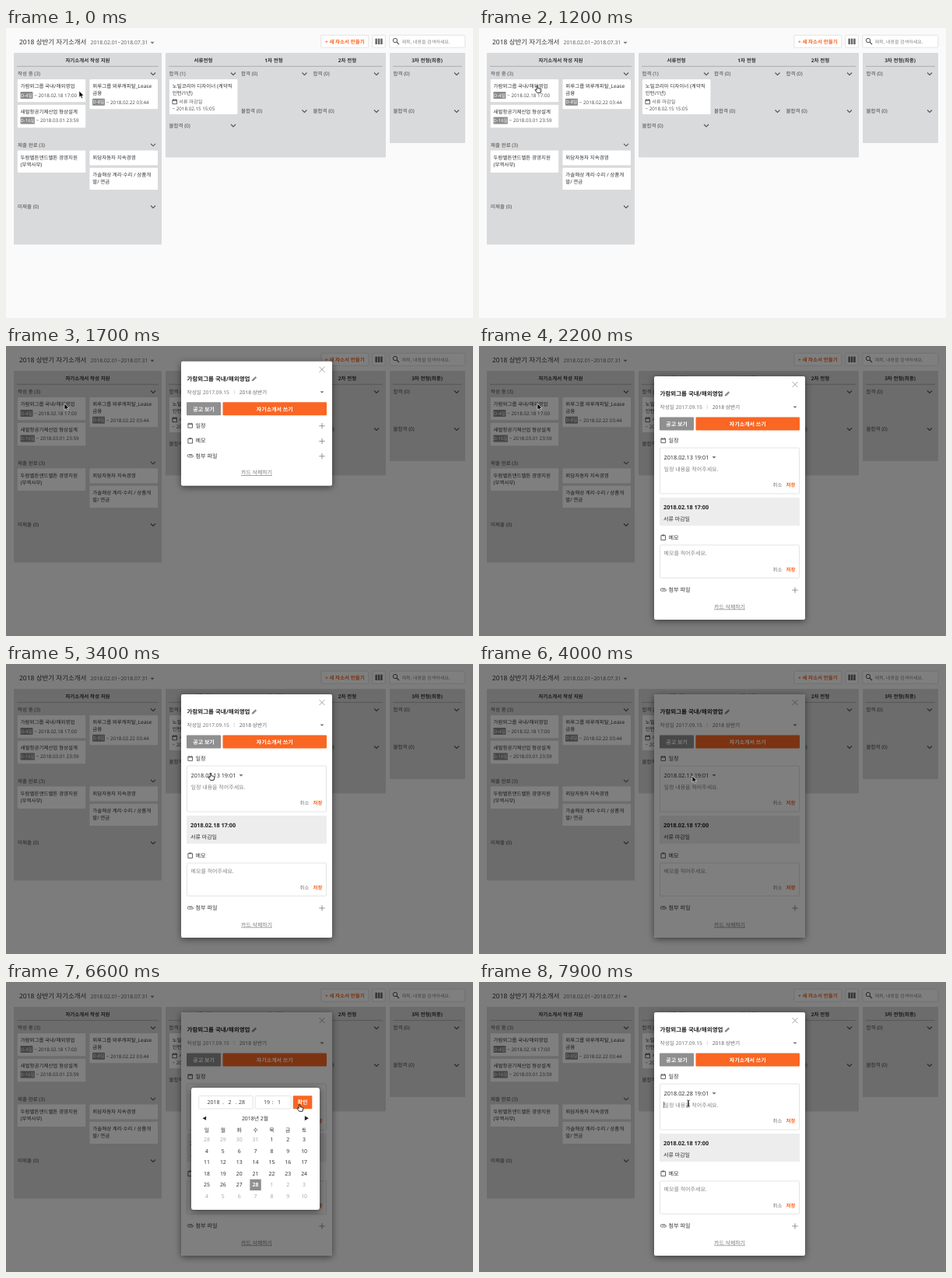
Recreate the animation shown at these times as an HTML page. Size 600 px wide and 373 px high, loop 8 s.

```html
<!DOCTYPE html>
<html>
<head>
<meta charset="utf-8">
<title>Application board</title>
<style>
html, body { margin: 0; width: 100%; height: 100%; overflow: hidden; background: #fafafa; }
svg { display: block; width: 600px; height: 373px; }
text { font-family: "Noto Sans", "Noto Sans CJK KR", "Noto Sans CJK", sans-serif; text-rendering: geometricPrecision; white-space: pre; }
.card { filter: drop-shadow(0 .6px .6px rgba(0,0,0,.22)); }
.panel { filter: drop-shadow(0 2px 4px rgba(0,0,0,.5)); }
</style>
</head>
<body>
<svg id="stage" viewBox="0 0 600 373"></svg>
<script>
const LOOP = 8000, ORANGE = '#fa6623', DARK = '#333', GREY = '#858585';

// Text is placed by its vertical middle.
const text = (x, y, s, size = 6.5, fill = DARK, extra = '') =>
  `<text x="${x}" y="${y + size * .37}" font-size="${size}" fill="${fill}" ${extra}>${s}</text>`;
const BOLD = 'font-weight="700"', MID = 'text-anchor="middle"', MIDBOLD = MID + ' ' + BOLD;
const rect = (x, y, w, h, fill, extra = '') =>
  `<rect x="${x}" y="${y}" width="${w}" height="${h}" fill="${fill}" ${extra}/>`;
const outline = (x, y, w, h) => rect(x, y, w, h, '#fff', 'stroke="#ddd" stroke-width=".8" rx="1"');
const line = (d, color = '#666', width = 1) =>
  `<path d="${d}" fill="none" stroke="${color}" stroke-width="${width}"/>`;
const shape = (d, fill) => `<path d="${d}" fill="${fill}"/>`;
const chevron = (x, y) => line(`M${x - 3} ${y - 1.5}l3 3 3-3`, '#555', 1.1);
const triangle = (x, y) => shape(`M${x - 2.5} ${y - 1.2}h5l-2.5 2.6z`, '#777');
const plus = (x, y) => line(`M${x - 3.7} ${y}h7.4M${x} ${y - 3.7}v7.4`, '#888', .9);
const calendarIcon = (x, y) =>
  line(`M${x - 2.8} ${y - 2.4}h5.6v5.3h-5.6zM${x - 2.8} ${y - 1.5}h5.6M${x - 1.6} ${y - 3.5}v1M${x + 1.6} ${y - 3.5}v1`, '#555', .9);
const clipboardIcon = (x, y) =>
  line(`M${x - 2.8} ${y - 2.7}h5.6v6h-5.6z`, '#555', .9) + rect(x - 1.4, y - 3.7, 2.8, 1.7, '#555');
const clipIcon = (x, y) =>
  line(`M${x + 2.5} ${y - 1.6}h-4.4a1.6 1.6 0 0 0 0 3.2h4.6a1.1 1.1 0 0 0 0-2.2h-4`, '#555', .8);
const group = (id, body, extra = '') => `<g id="${id}" ${extra}>${body}</g>`;

const card = (x, y, w, h, lines) => rect(x, y, w, h, '#fff', 'rx="1" class="card"') +
  lines.map((s, i) => text(x + 4, y + 9 + i * 9, s)).join('');
const due = (x, y, badge, date) => {
  const w = badge.length > 4 ? 18.5 : 16;
  return rect(x, y - 4.5, w, 9, '#8b8b8b', 'rx="1"') +
    text(x + w / 2, y, badge, 5.9, '#fff', MID) +
    text(x + w + 1.8, y, '~ ' + date, 6.25, '#555');
};
const section = (x, y, label, chevronX) => text(x, y, label, 6.5, '#4a4a4a', 'font-weight="500"') + chevron(chevronX, y);
const column = (x, w, h) => rect(x, 32, w, h, '#d9dadc', 'rx="1"') + line(`M${x + 4} 49.3h${w - 8}`, '#aaa', .9);
const heading = (x, s) => text(x, 41.3, s, 6.5, DARK, MIDBOLD);

const header =
  text(17, 18.2, '2018 상반기 자기소개서', 8.5, DARK, 'font-weight="500"') +
  text(108.5, 18.8, '2018.02.01~2018.07.31', 6.85, '#666') + triangle(188, 19) +
  outline(404.8, 9.2, 61, 16) + text(435.3, 17.3, '+ 새 자소서 만들기', 6.5, ORANGE, MIDBOLD) +
  outline(470.8, 9.2, 16.5, 16) + [474.4, 477.8, 481.2].map(x => rect(x, 13.6, 2.5, 7.4, '#666')).join('') +
  outline(492.8, 9.2, 97, 16) +
  '<circle cx="500" cy="16" r="2.7" fill="none" stroke="#555"/>' + line('M502 18l3 3.2', '#555', 1.2) +
  text(508.5, 17.3, '제목, 내용을 검색하세요.', 6.05, '#888');

const board =
  column(10, 190, 246.5) + heading(105, '자기소개서 작성 지원') +
  section(15, 59, '작성 중 (3)', 189) +
  card(14.5, 66, 88, 29.5, ['가람뫼그룹 국내/해외영업']) + due(18.5, 86.5, 'D-4일', '2018.02.18 17:00') +
  card(14.5, 98.5, 88, 30, ['새벌항공기체산업 형상설계']) + due(18.5, 119, 'D-16일', '2018.03.01 23:59') +
  card(107.2, 66, 88, 38.5, ['뫼루그룹 뫼루캐피탈_Lease', '금융']) + due(111, 95.3, 'D-8일', '2018.02.22 03:44') +
  section(15, 150.3, '제출 완료 (3)', 189) +
  card(14.5, 157.3, 88, 28.7, ['두람벨튼앤드벨튼 경영지원', '(무역사무)']) +
  card(107.2, 157.3, 88, 19.5, ['뫼담자동차 지속경영']) +
  card(107.2, 179.6, 88, 28.6, ['가솔해상 계리·수리 / 상품개', '발/ 연금']) +
  section(15, 230, '미제출 (0)', 189) +
  column(205, 283, 134.5) +
  heading(253.5, '서류전형') + heading(344, '1차 전형') + heading(438.5, '2차 전형') +
  section(209.5, 59, '합격 (1)', 292) + section(209.5, 125.5, '불합격 (0)', 292) +
  card(209.7, 66, 88, 45, ['노빌코리아 디자이너 (계약직', '인턴/1년)']) +
  calendarIcon(216.7, 94.8) + text(222, 94.7, '서류 마감일', 6.3, '#666') +
  text(213.5, 103.3, '~ 2018.02.15 15:05', 6.25, '#555') +
  column(493, 97, 116) + heading(541, '3차 전형(최종)') +
  [[302, 383.5], [394.5, 476], [497.5, 579]].map(([x, c]) =>
    section(x, 59, '합격 (0)', c) + section(x, 107, '불합격 (0)', c)).join('');

const formActions = y => text(377.5, y, '취소', 6.5, '#777') + text(394.5, y, '저장', 6.5, ORANGE, BOLD);
const rowTitle = (y, s) => text(243.5, y, s, 7.1, DARK);

const modal =
  rect(225, 39, 194, 313, '#fff', 'id="sheet" rx="2" class="panel"') +
  line('M402.5 46l7 7m0-7l-7 7', '#999', .9) +
  text(232.5, 61.3, '가람뫼그룹 국내/해외영업', 7.5, '#222', BOLD) +
  shape('M315.7 64.6l.5-2 4.3-4.3 1.6 1.6-4.3 4.3z', '#8a8a8a') +
  text(232.5, 78.6, '작성일 2017.09.15', 6.7, '#777') + line('M293.3 75.8v5.4', '#ccc', .7) +
  text(299.7, 78.6, '2018 상반기', 6.7, '#666') + triangle(406, 78.6) +
  rect(232, 91.5, 44, 17, '#8f8f8f', 'rx="1"') + text(254, 100.2, '공고 보기', 7, '#fff', MIDBOLD) +
  rect(278.5, 91.5, 133.5, 17, ORANGE, 'rx="1"') + text(345.3, 100.2, '자기소개서 쓰기', 7, '#fff', MIDBOLD) +
  calendarIcon(236.7, 121.5) + rowTitle(121.3, '일정') +
  group('compact', plus(406, 122) + plus(406, 141.7)) +
  group('forms',
    outline(232.5, 131, 179, 59) + text(237.5, 143.2, '', 7.3, DARK, 'id="when"') + triangle(302, 143.3) +
    text(237.5, 158, '일정 내용을 적어주세요.', 7, GREY) +
    line('M237.6 154v8', '#222', .7).replace('<path', '<path id="caret"') + formActions(179) +
    rect(232, 195, 180, 36.3, '#ededed', 'rx="1"') +
    text(237, 207.3, '2018.02.18 17:00', 7.3, '#222', 'font-weight="600"') + text(237, 222, '서류 마감일', 7, DARK) +
    outline(232.5, 256, 179, 42.3) + text(237.5, 266.7, '메모를 적어주세요.', 7, GREY) + formActions(287.5)) +
  group('memo', clipboardIcon(236.7, 246.3) + rowTitle(246, '메모')) +
  group('files', clipIcon(236.7, 313.5) + rowTitle(313.3, '첨부 파일') + plus(406, 314) +
    text(322, 335, '카드 삭제하기', 6.9, '#777', MID + ' text-decoration="underline"'));

const DAY_STEP = 20.85, ROW_STEP = 14.65;
const dayX = i => 258 + (i % 7) * DAY_STEP, dayY = i => 202.3 + Math.floor(i / 7) * ROW_STEP;

function dayCells() {
  let cells = '';
  for (let i = 0; i < 42; i++) {
    const n = i - 3, inside = n >= 1 && n <= 28;
    const label = n < 1 ? n + 31 : n > 28 ? n - 28 : n;
    cells += text(dayX(i), dayY(i), label, 6.9, inside ? DARK : '#aaa', MID);
  }
  return cells;
}

const picker =
  rect(238, 136, 165, 157, '#fff', 'rx="3" class="panel"') +
  outline(247.7, 146.5, 69.5, 16.5) + outline(320.2, 146.5, 46, 16.5) +
  [[258.5, '2018'], [278, '.'], [285.5, '2'], [294.5, '.'], [331, '19'], [341.8, ':'], [349, '1']]
    .map(([x, s]) => text(x, 154.8, s, 7, '#444')).join('') +
  text(299, 154.8, '', 7, '#444', 'id="dayField"') +
  rect(368.8, 146.3, 24.5, 17, ORANGE, 'rx="1"') + text(381, 154.8, '확인', 7, '#fff', MIDBOLD) +
  shape('M252.5 175.3l4.6-2.5v5z', '#222') + shape('M388.8 175.3l-5-3v6z', '#222') +
  text(320, 175.2, '2018년 2월', 6.9, DARK, MID) +
  [...'일월화수목금토'].map((s, i) => text(dayX(i), 190, s, 6.9, DARK, MID + ' font-weight="500"')).join('') +
  dayCells() +
  group('picked', rect(-7.2, -7.2, 14.4, 14.4, '#8f8f8f') + text(0, 0, '', 6.9, '#fff', MIDBOLD + ' id="pickedDay"'));

const cursors =
  group('arrow', '<path d="M0 0v8.2l1.9-1.7 1.3 2.9 1.4-.6-1.3-2.8h2.6z" fill="#000" stroke="#fff" stroke-width=".6"/>') +
  group('hand', '<path d="M-.8 .6q.8-1.2 1.6 0v3l3.2 .7q1 .4 .8 1.6l-.7 3.4h-4.5l-2.6-3.6q.2-1.2 1.3-.6l.9 .7z" fill="#fff" stroke="#000" stroke-width=".8"/>') +
  group('beam', line('M-1.7-4q1.7 0 1.7 1v6q0 1-1.7 1M1.7-4q-1.7 0-1.7 1v6q0 1 1.7 1', '#111', .8));

const veil = id => rect(0, 0, 600, 373, '#000', `id="${id}"`);
document.getElementById('stage').innerHTML =
  rect(0, 0, 600, 373, '#fafafa') + header + board + veil('backdrop') +
  group('modal', modal + rect(225, 39, 194, 313, '#000', 'id="modalVeil" rx="2"')) +
  group('picker', picker) + group('cursor', cursors);

const el = id => document.getElementById(id);
const set = (id, attrs) => { for (const k in attrs) el(id).setAttribute(k, attrs[k]); };
const show = (id, on) => { el(id).style.display = on ? '' : 'none'; };
const smooth = p => p * p * (3 - 2 * p);
const linear = p => p;

// Keys are [time, value, ...]; returns the values at time t.
function track(t, keys, ease = linear) {
  const next = keys.findIndex(k => k[0] > t);
  if (next === 0) return keys[0].slice(1);
  if (next < 0) return keys[keys.length - 1].slice(1);
  const a = keys[next - 1], b = keys[next], p = ease((t - a[0]) / (b[0] - a[0]));
  return a.slice(1).map((v, i) => v + (b[i + 1] - v) * p);
}

const POINTER = [[100, 94, 81], [800, 75, 74], [2800, 75, 74], [3500, 274, 144], [4700, 274, 144],
  [5200, 321, 259], [5700, 321, 259], [6400, 377, 157], [7300, 377, 157], [7700, 269, 156]];
const POINTER_KINDS = [[0, 'arrow'], [800, 'hand'], [1300, 'arrow'], [3400, 'hand'], [3900, 'arrow'],
  [5000, 'hand'], [5800, 'arrow'], [6400, 'hand'], [7000, 'beam']];

function draw(t) {
  const [fade] = track(t, [[1250, 0], [1400, .7], [1500, 1]]);
  const [lift] = track(t, [[1300, -48], [1400, -41], [1800, -12], [1950, 0]]);
  const open = t >= 1900;
  set('backdrop', { opacity: fade * .5 });
  set('modal', { opacity: fade, transform: `translate(0 ${lift})` });
  set('sheet', { height: open ? 313 : 160 });
  show('forms', open);
  show('compact', !open);
  set('memo', { transform: `translate(0 ${open ? 0 : -105.3})` });
  set('files', { transform: `translate(0 ${open ? 0 : -153})` });

  const [veilLevel] = track(t, [[3800, 0], [4000, .5], [6800, .5], [7000, 0]]);
  set('modalVeil', { opacity: veilLevel });
  const [seen, drop] = track(t, [[4000, 0, -40], [4100, .6, -30], [4300, 1, 0], [6700, 1, 0], [6900, 0, -30]]);
  set('picker', { opacity: seen, transform: `translate(0 ${drop})` });

  const day = t >= 5400 ? 28 : 13, cell = day + 3;
  el('dayField').textContent = el('pickedDay').textContent = day;
  set('picked', { transform: `translate(${dayX(cell)} ${dayY(cell)})` });
  el('when').textContent = `2018.02.${t >= 6800 ? 28 : 13} 19:01`;
  show('caret', t >= 7800);

  const [x, y] = track(t, POINTER, smooth);
  set('cursor', { transform: `translate(${x} ${y})` });
  const kind = POINTER_KINDS.filter(k => k[0] <= t).pop()[1];
  for (const id of ['arrow', 'hand', 'beam']) show(id, id === kind);
}

const start = performance.now();
function tick() {
  const t = (performance.now() - start) % LOOP;
  draw(Math.floor(t / 100) * 100);
  requestAnimationFrame(tick);
}
tick();
</script>
</body>
</html>
```
